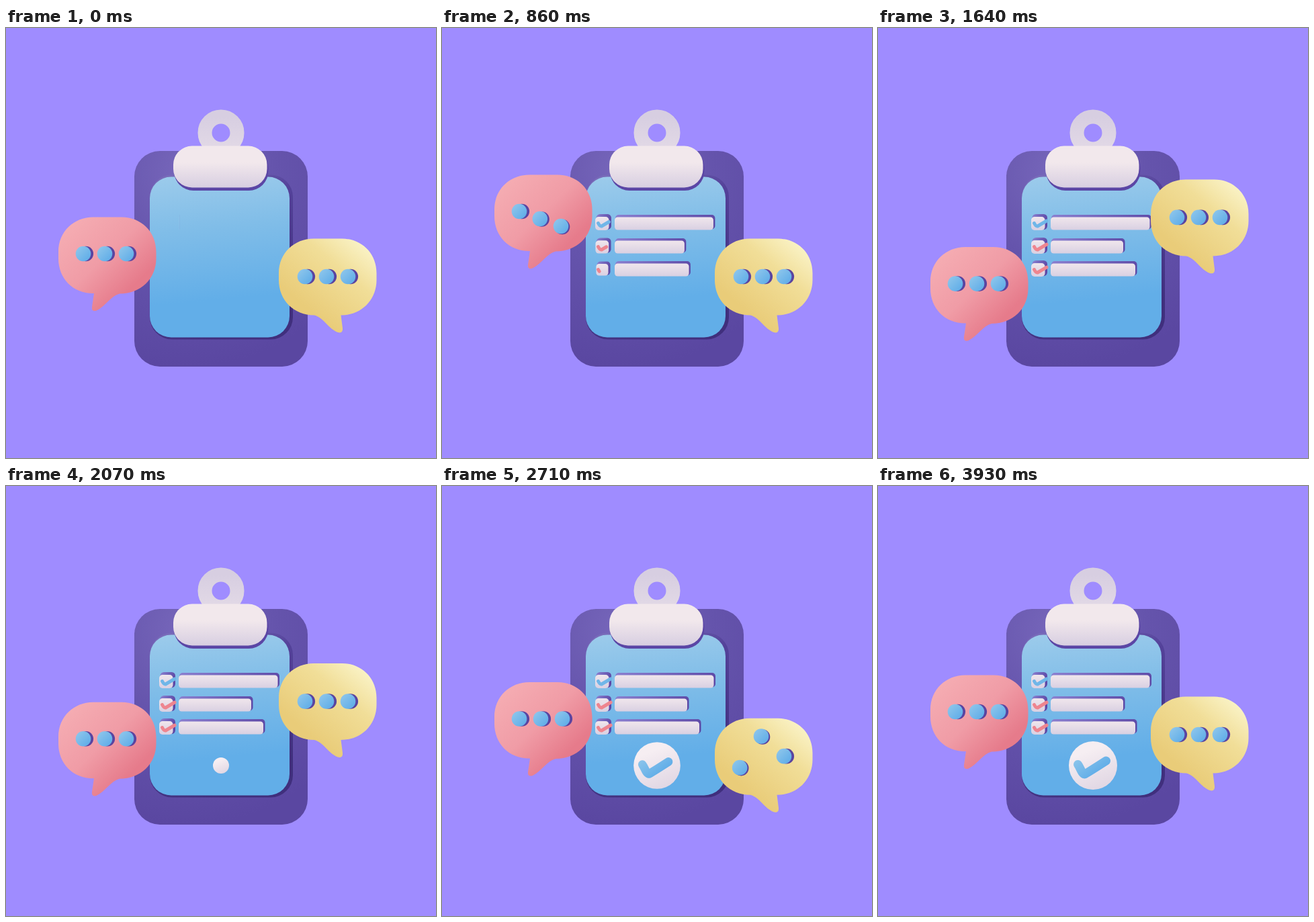
These frames come from a looping animation (640x640 px, 4000 ms). An HTML page:

```html
<!DOCTYPE html>
<html lang="en">
<head>
<meta charset="utf-8">
<title>Checklist</title>
<style>
  html, body { margin: 0; height: 100%; overflow: hidden; background: #9f8cff; }
  svg { display: block; width: 100vw; height: 100vh; }
  .check { fill: none; stroke-linecap: round; stroke-linejoin: round; }
</style>
</head>
<body>
<svg id="stage" viewBox="0 0 640 640">
  <defs>
    <radialGradient id="board" gradientUnits="userSpaceOnUse" cx="270" cy="215" r="290">
      <stop stop-color="#7767bb"/><stop offset=".45" stop-color="#6554ac"/><stop offset="1" stop-color="#5a47a1"/>
    </radialGradient>
    <linearGradient id="edge" x2=".4" y2="1">
      <stop stop-color="#7d70bd"/><stop offset=".4" stop-color="#54429a"/><stop offset="1" stop-color="#402f7d"/>
    </linearGradient>
    <linearGradient id="paper" x2=".08" y2="1">
      <stop stop-color="#9ccbeb"/><stop offset=".35" stop-color="#80bde8"/><stop offset=".8" stop-color="#62aee8"/>
    </linearGradient>
    <linearGradient id="ring" x2="0" y2="1">
      <stop stop-color="#d7cee1"/><stop offset="1" stop-color="#e2d9e6"/>
    </linearGradient>
    <linearGradient id="clip" x2="0" y2="1">
      <stop offset=".4" stop-color="#f2e8ec"/><stop offset="1" stop-color="#d7cee1"/>
    </linearGradient>
    <linearGradient id="bar" x2="0" y2="1">
      <stop stop-color="#f0e6ec"/><stop offset="1" stop-color="#d9d0e2"/>
    </linearGradient>
    <linearGradient id="side" x2="1" y2=".3">
      <stop stop-color="#8a80d0"/><stop offset="1" stop-color="#5d49a6"/>
    </linearGradient>
    <linearGradient id="pink" x2="1" y2="1">
      <stop offset=".1" stop-color="#f5acb2"/><stop offset=".45" stop-color="#f09ca6"/><stop offset=".75" stop-color="#e67b8b"/>
    </linearGradient>
    <linearGradient id="yellow" x1=".3" y1=".75" x2=".95" y2="0">
      <stop stop-color="#e9cc79"/><stop offset=".55" stop-color="#f1de98"/><stop offset="1" stop-color="#fcf8d2"/>
    </linearGradient>
    <linearGradient id="dot" x2="1" y2="1">
      <stop offset=".1" stop-color="#8dc5eb"/><stop offset=".9" stop-color="#5fade8"/>
    </linearGradient>
    <linearGradient id="disc" x1=".3" x2=".7" y2="1">
      <stop offset=".2" stop-color="#f6eef2"/><stop offset="1" stop-color="#e0d6e3"/>
    </linearGradient>
    <linearGradient id="blueTick" gradientUnits="userSpaceOnUse" x1="300" y1="402" x2="322" y2="432">
      <stop stop-color="#8cc5eb"/><stop offset="1" stop-color="#60ade8"/>
    </linearGradient>
  </defs>

  <rect x="191" y="183" width="258" height="321" rx="38" fill="url(#board)"/>
  <rect x="214" y="218.5" width="213" height="245" rx="33" fill="url(#edge)"/>
  <rect x="214" y="221.5" width="208" height="239" rx="32" fill="url(#paper)"/>
  <circle cx="320" cy="156" r="24" fill="none" stroke="url(#ring)" stroke-width="21"/>
  <rect x="250" y="179" width="140.5" height="63" rx="29" fill="#5b46a5"/>
  <rect x="249" y="175.5" width="139.5" height="62" rx="28" fill="url(#clip)"/>

  <g id="rows"></g>
  <g id="badge">
    <circle cx="320" cy="416" r="36" fill="url(#disc)"/>
    <path id="tick" class="check" pathLength="1" stroke="url(#blueTick)" stroke-width="13"
      d="M297.5 414.5C301 419 303 428 307.5 429Q310 428 339.5 409"/>
  </g>
  <g id="pinkBubble" fill="url(#pink)">
    <path d="M130 281.5H172C201 281.5 223.5 303 223.5 333V343C223.5 373 201 395.5 169 395.5C156 399 149 413 135 420.5Q127 423 128 415L131 395C100 395.5 78 373 78 343V333C78 303 101 281.5 130 281.5Z"/>
  </g>
  <g id="yellowBubble" fill="url(#yellow)">
    <path d="M458 313.5H500C529 313.5 551.5 335 551.5 365V375C551.5 405 529 427.5 498.500 427.500L501 447Q501.500 455 494 453C480 448 473 431 459 427.500C428 427.500 406 405 406 375V365C406 335 429 313.5 458 313.5Z"/>
  </g>
</svg>
<script>
const LOOP = 4000;
const byId = id => document.getElementById(id);
const clamp = v => Math.min(1, Math.max(0, v));

function add(parent, tag, attrs) {
  const el = document.createElementNS("http://www.w3.org/2000/svg", tag);
  set(el, attrs);
  parent.append(el);
  return el;
}
function set(el, attrs) {
  for (const key in attrs) el.setAttribute(key, attrs[key]);
}

// Bezier easing (0.03, 0, 0, 1): very quick start, long settle
function settle(x) {
  if (x <= 0) return 0;
  if (x >= 1) return 1;
  let lo = 0, hi = 1;
  for (let i = 0; i < 24; i++) {
    const s = (lo + hi) / 2;
    if (0.09 * s * (1 - s) ** 2 + s ** 3 < x) lo = s; else hi = s;
  }
  return lo * lo * (3 - 2 * lo);
}
const sine = x => (1 - Math.cos(Math.PI * x)) / 2;
const rise = (t, start, length) => settle(clamp((t - start) / length));

function track(t, keys, ease) {
  if (t <= keys[0][0]) return keys[0][1];
  for (let i = 1; i < keys.length; i++) {
    const [t0, v0] = keys[i - 1], [t1, v1] = keys[i];
    if (t < t1) return v0 + (v1 - v0) * ease((t - t0) / (t1 - t0));
  }
  return keys[keys.length - 1][1];
}

function scaleAbout(el, x, y, k) {
  set(el, { transform: `translate(${x} ${y}) scale(${k}) translate(${-x} ${-y})` });
}
function trim(el, amount) {
  set(el, { "stroke-dasharray": `${amount} 2`, visibility: amount > 0 ? "visible" : "hidden" });
}

const rows = [[281.5, 147.5], [316.5, 108], [350.5, 126]].map(([y, width], i) => {
  const g = byId("rows");
  const side = add(g, "rect", { x: 258, y: y - 3.5, height: 21.5, rx: 5, fill: "url(#side)" });
  const front = add(g, "rect", { x: 257, y, height: 19, rx: 4.5, fill: "url(#bar)" });
  const box = add(g, "g", {});
  add(box, "rect", { x: 229.5, y: y - 4.5, width: 22.5, height: 23, rx: 5.5, fill: "url(#side)" });
  add(box, "rect", { x: 228, y: y - 0.5, width: 20.5, height: 20, rx: 5, fill: "url(#bar)" });
  const check = add(g, "path", {
    class: "check", pathLength: 1, "stroke-width": 5,
    stroke: i ? "#ee858f" : "#70b6e8",
    d: `M232.500 ${y + 9}Q235 ${y + 14} 237.500 ${y + 13.5}L251 ${y + 5.5}`
  });
  return { y, width, side, front, box, check, start: 200 * i };
});

function bubble(id, x, y, waveStart, keys) {
  const g = byId(id);
  const dots = [0, 1, 2].map(i => {
    const cx = x + 32 * i;
    return {
      cx,
      shade: add(g, "circle", { r: 11.3, fill: "#5a44a0" }),
      face: add(g, "circle", { r: 11.3, fill: "url(#dot)" })
    };
  });
  return { g, y, waveStart, keys, dots };
}
const bubbles = [
  bubble("pinkBubble", 115, 336, 0, [[0, 0], [900, -63], [960, -63], [2000, 50], [LOOP, 0]]),
  bubble("yellowBubble", 445, 370, 2300, [[960, 0], [2000, -92.5], [3000, 36.5], [LOOP, 0]])
];
const hop = [[0, 0], [220, -30], [460, 22], [860, 0]];

function draw(t) {
  for (const { y, width, side, front, box, check, start } of rows) {
    const grown = rise(t, start, 960);
    set(front, { width: width * grown });
    set(side, { width: (width + 1.5) * grown });
    scaleAbout(box, 240, y + 7.5, grown);
    trim(check, rise(t, start + 440, 900));
  }

  scaleAbout(byId("badge"), 320, 416, rise(t, 2000, 1000));
  trim(byId("tick"), rise(t, 2080, 900));

  for (const { g, y, waveStart, keys, dots } of bubbles) {
    set(g, { transform: `translate(0 ${track(t, keys, settle)})` });
    dots.forEach(({ cx, shade, face }, i) => {
      const dy = track(t - waveStart - 200 * i, hop, sine);
      const lean = Math.min(1, Math.abs(dy) / 18);
      const x = cx - 2 * lean;
      set(face, { cx: x, cy: y + dy });
      set(shade, { cx: x + 3.8 - 1.8 * lean, cy: y + dy + lean });
    });
  }
}

function tickFrame() {
  draw(performance.now() % LOOP);
  requestAnimationFrame(tickFrame);
}
draw(0);
requestAnimationFrame(tickFrame);
</script>
</body>
</html>
```
